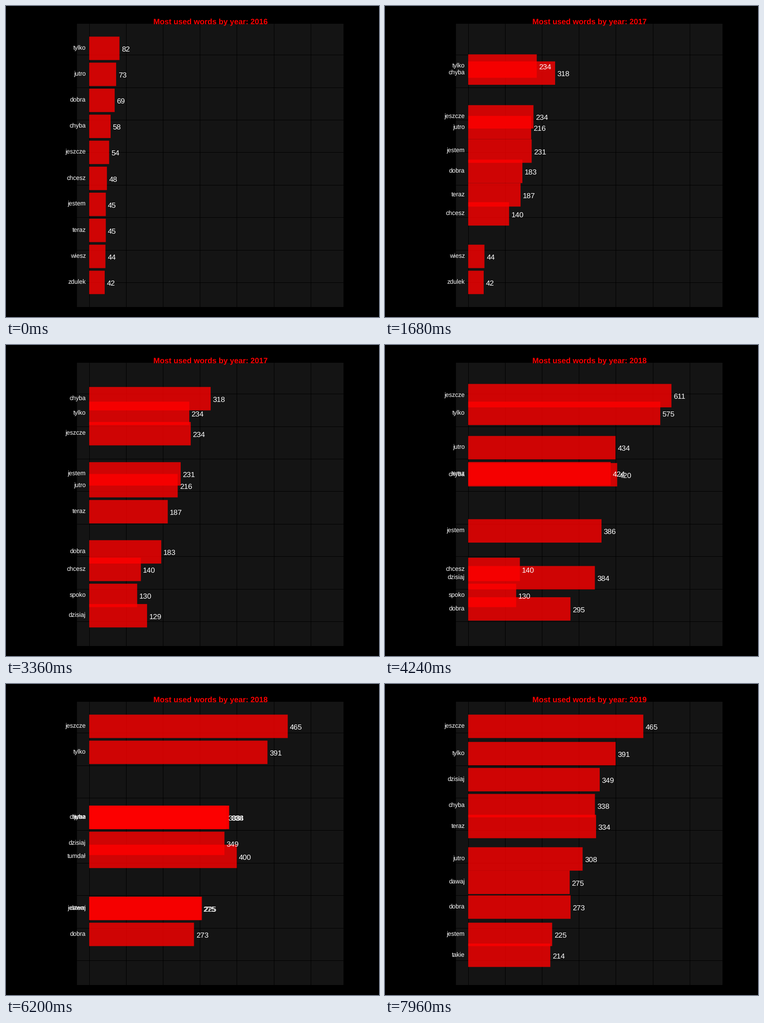
Animation, 820 px wide and 683 px high, one loop 8 s. Source, as a matplotlib script:

```python
import math

import matplotlib.pyplot as plt
from matplotlib.animation import FuncAnimation
from matplotlib.patches import Rectangle

plt.rcParams["font.family"] = "Liberation Sans"
plt.rcParams["text.hinting"] = "none"

W, H, DPI = 820, 683, 80
FRAMES, STEP_MS = 200, 40

# Frames before the first move, length of a move, and length of move plus rest
LEAD, MOVE, CYCLE = 16, 42, 59

PANEL = (156, 39, 742, 661)
X0, X_SCALE = 182.9, 0.8113
TOP, PITCH, BAR_H = 67.27, 57.117, 51.4

NAME_PX, VALUE_PX, TITLE_PX = 13.55, 16.35, 17.0
SPACE = 0.278  # width of a blank, in em

FIRST_YEAR = 2016
# Words in order of rank with their counts, one table per year
COUNTS = [
    {"tylko": 82, "jutro": 73, "dobra": 69, "chyba": 58, "jeszcze": 54,
     "chcesz": 48, "jestem": 45, "teraz": 45, "wiesz": 44, "zdulek": 42},
    {"chyba": 318, "tylko": 234, "jeszcze": 234, "jestem": 231, "jutro": 216,
     "teraz": 187, "dobra": 183, "chcesz": 140, "spoko": 130, "dzisiaj": 129},
    {"jeszcze": 611, "tylko": 575, "jutro": 434, "teraz": 424, "chyba": 420,
     "tumdał": 400, "jestem": 386, "dzisiaj": 384, "dawaj": 331, "dobra": 295},
    {"jeszcze": 465, "tylko": 391, "dzisiaj": 349, "chyba": 338, "teraz": 334,
     "jutro": 308, "dawaj": 275, "dobra": 273, "jestem": 225, "takie": 214},
    {"jeszcze": 657, "teraz": 586, "tylko": 563, "dzisiaj": 497, "chyba": 447,
     "takie": 386, "dobra": 362, "jutro": 349, "jestem": 275},
]
RANKS = [{word: i for i, word in enumerate(year)} for year in COUNTS]
WORDS = sorted(set().union(*COUNTS))

# W / DPI and H / DPI are exact in binary or round up safely with this margin
fig = plt.figure(figsize=((W + 0.01) / DPI, (H + 0.01) / DPI), dpi=DPI,
                 facecolor="black")
ax = fig.add_axes([0, 0, 1, 1])
ax.set_xlim(0, W)
ax.set_ylim(H, 0)
ax.axis("off")


def box(x, y, w, h, color, z, **kw):
    return ax.add_patch(Rectangle((x, y), w, h, fc=color, lw=0, zorder=z, **kw))


def label(x, y, text, px, **kw):
    kw.setdefault("color", "white")
    return ax.text(x, y, text, fontsize=px * 72 / DPI, va="baseline", zorder=4, **kw)


def center(rank):
    return TOP + BAR_H / 2 + PITCH * rank


def mix(a, b, s):
    return a + (b - a) * s


def draw_panel():
    left, top, right, bottom = PANEL
    box(left, top, right - left, bottom - top, "#141414", 0)
    for i in range(7):
        box(round(X0 + 100 * i * X_SCALE), top, 1, bottom - top, "black", 1)
    for i in range(1, 9):
        box(left, round(center(1.25 * i - 1)), right - left, 1, "black", 1)


draw_panel()
title = label((PANEL[0] + PANEL[2]) / 2 + 0.4, 39.5, "", TITLE_PX,
              color="red", weight="bold", ha="center")
rows = {
    word: (
        box(X0, 0, 0, BAR_H, "red", 2, alpha=0.8, snap=False),
        label(X0 - 2 * SPACE * NAME_PX, 0, word, NAME_PX, ha="right"),
        label(X0, 0, "", VALUE_PX, ha="left"),
    )
    for word in WORDS
}


def phase(frame):
    """Index of the current year and progress towards the next one."""
    if frame < LEAD:
        return 0, 0.0
    k, step = divmod(frame - LEAD, CYCLE)
    return (k, step / MOVE) if step < MOVE else (k + 1, 0.0)


def place(word, rank, value, count):
    bar, name, number = rows[word]
    mid = center(rank)
    end = X0 + value * X_SCALE
    bar.set_bounds(X0, mid - BAR_H / 2, end - X0, BAR_H)
    name.set_y(mid + 2.8)
    number.set_position((end + SPACE * VALUE_PX, mid + 6.8))
    number.set_text(str(count))


def update(frame):
    k, p = phase(frame)
    s = (1 - math.cos(math.pi * p)) / 2
    nxt = min(k + 1, len(COUNTS) - 1)
    now, later = COUNTS[k], COUNTS[nxt]
    for word in WORDS:
        shown = word in now
        for artist in rows[word]:
            artist.set_visible(shown)
        if not shown:
            continue
        rank, count = RANKS[k][word], now[word]
        if word in later:
            place(word, mix(rank, RANKS[nxt][word], s), mix(count, later[word], s),
                  later[word] if p >= 0.5 else count)
        else:
            # Words that drop out hold still until the move is over
            place(word, rank, count, count)
    year = FIRST_YEAR + k + (p > 0.5)
    title.set_text(f"Most used words by year: {year}")
    return []


anim = FuncAnimation(fig, update, frames=FRAMES, interval=STEP_MS,
                     init_func=lambda: update(0), repeat=True, repeat_delay=0,
                     blit=False)
plt.show()
```
